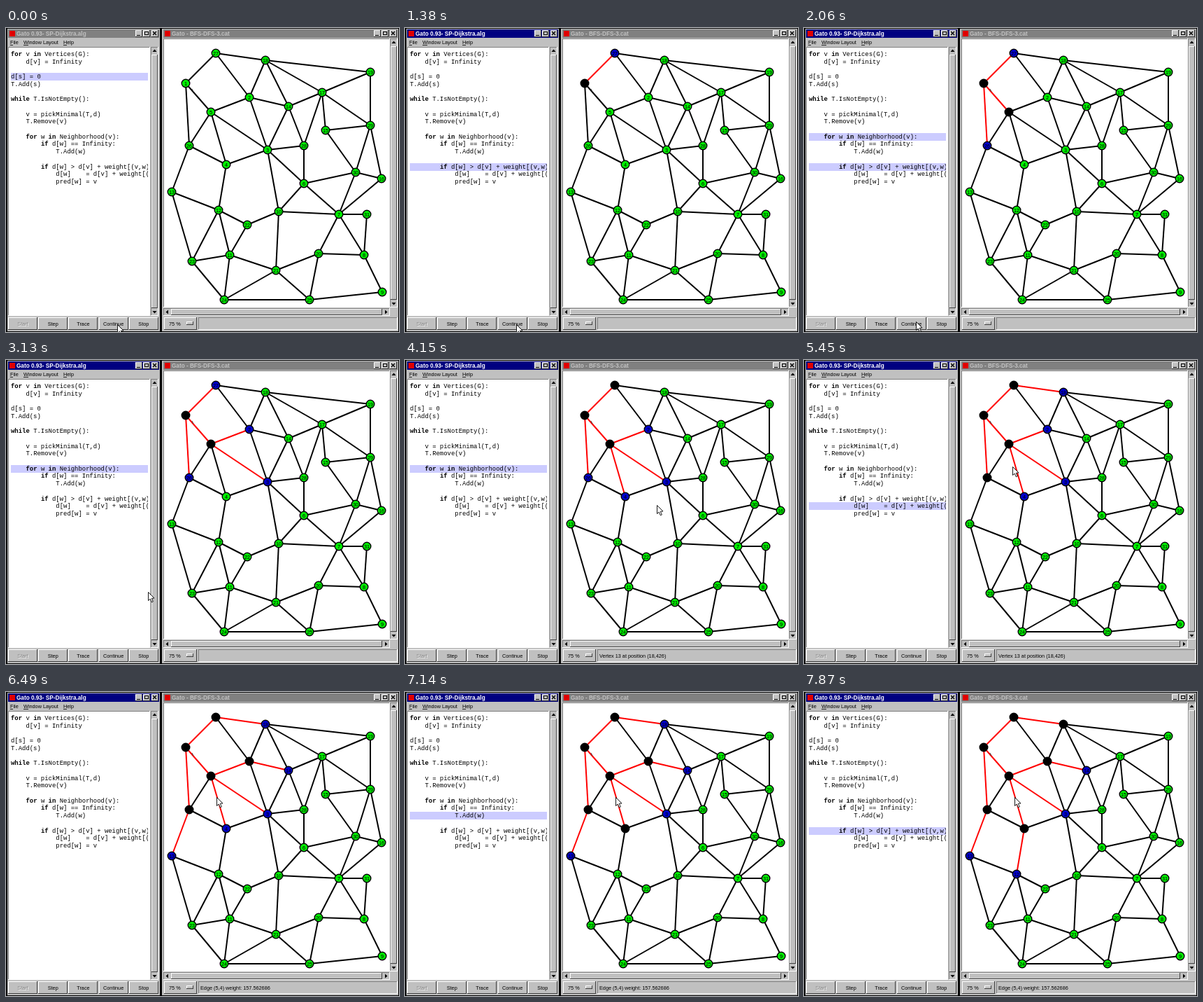
Animation of 562x434 px, one loop 8 s. Source, as an HTML page with a canvas:

```html
<!DOCTYPE html>
<html lang="en">
<head>
<meta charset="utf-8">
<title>Shortest paths</title>
<style>
html, body { margin: 0; width: 562px; height: 434px; overflow: hidden; background: #000; }
canvas { display: block; }
</style>
</head>
<body>
<canvas id="stage" width="562" height="434"></canvas>
<script>
const ctx = document.getElementById('stage').getContext('2d');
const LOOP = 8000;
const GRAY = '#c0c0c0', DARK = '#808080', NAVY = '#000080';
const SANS = '"Liberation Sans", Arial, sans-serif';
const MONO = '"Liberation Mono", "Courier New", monospace';
const ROW = 10.7, CHAR = 5.36, TOP = 32;

// Bold words are wrapped in asterisks.
const code = [
  '*for* v *in* Vertices(G):',
  '    d[v] = Infinity',
  '',
  'd[s] = 0',
  'T.Add(s)',
  '',
  '*while* T.IsNotEmpty():',
  '',
  '    v = pickMinimal(T,d)',
  '    T.Remove(v)',
  '',
  '    *for* w *in* Neighborhood(v):',
  '        *if* d[w] == Infinity:',
  '            T.Add(w)',
  '',
  '        *if* d[w] > d[v] + weight[(v,w)]:',
  '            d[w]    = d[v] + weight[(v,w)]',
  '            pred[w] = v'
];

// id:x,y
const nodes = {};
`1:257,79 2:348,99 3:374,174 4:315,195 5:293,120 6:426,222 7:476,266 8:512,324
9:538,377 10:390,262 11:320,324 12:304,260 13:237,234 14:404,112 15:457,146
16:537,215 17:452,92 18:371,46 19:521,63 20:447,322 21:386,346 22:345,281
23:266,333 24:312,388 25:434,388 26:262,168 27:300,36 28:426,168 29:521,139
30:500,206 31:516,266`.split(/\s+/).forEach(s => {
  const [id, x, y] = s.split(/[:,]/).map(Number);
  nodes[id] = { x, y };
});

// id:neighbours
const edges = `27:1,18,2 18:19,17,2,14 19:17,29 1:5,26 5:2,3,4,26 2:14,3 14:17,28,3
17:28,15,29 15:29,30 29:30,16 30:16,6,7 28:6,3 3:4,6,10 6:10,7 16:7 7:31,8,20,10
31:8 10:21,22 26:4,13 4:12 13:12,23 12:22,11,23 22:11 11:23,24,21 23:24
21:24,25,20 20:25,8 24:25 25:9 8:9`.split(/\s+/).flatMap(s => {
  const [from, list] = s.split(':');
  return list.split(',').map(to => [from, to]);
});

const vertexInfo = 'Vertex 13 at position (18,426)';
const edgeInfo = 'Edge (5,4) weight: 157.562686';

// Each step changes only what it names.
const steps = [
  { t: 0, lines: [4], cursor: [159, 423], active: false, info: '' },
  { t: 100, active: true },
  { t: 720, lines: [12], done: 1 },
  { t: 1380, lines: [16], queue: 27, red: '27-1' },
  { t: 1730, lines: [17], queue: 5, red: '1-5' },
  { t: 2060, lines: [12, 16], done: 5, queue: 26, red: '1-26', cursor: [160, 419] },
  { t: 2440, lines: [16], cursor: [171, 403] },
  { t: 2780, lines: [17], queue: 2, red: '5-2', cursor: [187, 368] },
  { t: 3130, lines: [12], queue: 3, red: '5-3', cursor: [203, 331] },
  { t: 3460, lines: [16], cursor: [219, 274] },
  { t: 3770, lines: [12], queue: 4, red: '5-4', cursor: [238, 229], info: vertexInfo },
  { t: 4150, done: 27, cursor: [360, 207] },
  { t: 4440, lines: [16], queue: 18, red: '27-18', cursor: [291, 161] },
  { t: 4800, lines: [10], cursor: [292, 159] },
  { t: 5140, lines: [16], done: 26, cursor: [297, 156] },
  { t: 5450, lines: [17], cursor: [298, 152] },
  { t: 5800, lines: [16], done: 2, queue: 13, red: '26-13' },
  { t: 6160, cursor: [301, 150], info: edgeInfo },
  { t: 6490, lines: [], queue: 14, red: '2-14' },
  { t: 6830, lines: [16], done: 4 },
  { t: 7140, lines: [14] },
  { t: 7500, lines: [12], done: 18, queue: 12, red: '4-12' },
  { t: 7870, lines: [16] }
];

function stateAt(time) {
  const state = { fill: {}, red: new Set() };
  for (const s of steps) {
    if (s.t > time) break;
    for (const key of ['lines', 'cursor', 'active', 'info'])
      if (key in s) state[key] = s[key];
    if (s.done) state.fill[s.done] = '#000';
    if (s.queue) state.fill[s.queue] = '#0000cc';
    if (s.red) state.red.add(s.red);
  }
  return state;
}

function rect(x, y, w, h, color) {
  ctx.fillStyle = color;
  ctx.fillRect(x, y, w, h);
}

function bevel(x, y, w, h, sunken = false, fill = GRAY) {
  rect(x, y, w, h, sunken ? '#fff' : '#404040');
  rect(x, y, w - 1, h - 1, sunken ? DARK : '#fff');
  rect(x + 1, y + 1, w - 2, h - 2, fill);
}

function text(str, x, y, size, color = '#000', style = '', align = 'left', family = SANS) {
  ctx.font = `${style} ${size}px ${family}`;
  ctx.textAlign = align;
  ctx.textBaseline = 'alphabetic';
  ctx.fillStyle = color;
  ctx.fillText(str, x, y);
}

function line(x1, y1, x2, y2, color, width = 1) {
  ctx.strokeStyle = color;
  ctx.lineWidth = width;
  ctx.beginPath();
  ctx.moveTo(x1, y1);
  ctx.lineTo(x2, y2);
  ctx.stroke();
}

function poly(points, fill) {
  ctx.beginPath();
  points.forEach(([x, y]) => ctx.lineTo(x, y));
  ctx.closePath();
  ctx.fillStyle = fill;
  ctx.fill();
}

function arrow(x, y, angle) {
  ctx.save();
  ctx.translate(x, y);
  ctx.rotate(angle);
  poly([[0, -2], [3, 1.5], [-3, 1.5]], '#000');
  ctx.restore();
}

function titleBar(x, w, title, active) {
  rect(x, 2, w, 12, active ? NAVY : DARK);
  rect(x + 2, 4, 8, 8, '#e00000');
  text(title, x + 12, 11, 8.2, active ? '#fff' : GRAY, 'bold');
  const right = x + w;
  [right - 34, right - 23, right - 11].forEach(bx => bevel(bx, 3, 10, 10));
  rect(right - 32, 10, 5, 1, '#000');
  ctx.strokeStyle = '#000';
  ctx.lineWidth = 1;
  ctx.strokeRect(right - 20.5, 5.5, 5, 4);
  line(right - 9, 5, right - 4, 10, '#000', 1.2);
  line(right - 4, 5, right - 9, 10, '#000', 1.2);
}

function vScroll(x, y, w, h) {
  bevel(x, y, w, h, true);
  bevel(x + 1, y + 11, w - 2, h - 22);
  arrow(x + w / 2, y + 5.5, 0);
  arrow(x + w / 2, y + h - 5.5, Math.PI);
}

function hScroll(x, y, w, h) {
  bevel(x, y, w, h, true);
  bevel(x + 11, y + 1, w - 22, h - 2);
  arrow(x + 5.5, y + h / 2, -Math.PI / 2);
  arrow(x + w - 5.5, y + h / 2, Math.PI / 2);
}

function codeLine(str, row) {
  let col = 0;
  const y = TOP + row * ROW + 8;
  str.split('*').forEach((part, i) => {
    const lead = part.length - part.trimStart().length;
    text(part.trimStart(), 7 + (col + lead) * CHAR, y, CHAR / 0.6, '#000',
      i % 2 ? 'bold' : '', 'left', MONO);
    col += part.length;
  });
}

function codeWindow(state) {
  rect(2, 1, 218, 432, GRAY);
  titleBar(3, 216, 'Gato 0.93- SP-Dijkstra.alg', state.active);

  [['File', 6, 4], ['Window Layout', 25, 7], ['Help', 82, 5]].forEach(([label, x, w]) => {
    text(label, x, 23, 7.3);
    rect(x, 24, w, 0.8, '#000');
  });

  bevel(3, 27, 203, 384, true, '#fff');
  ctx.save();
  ctx.beginPath();
  ctx.rect(7, 28, 196, 380);
  ctx.clip();
  for (const n of state.lines)
    rect(7, Math.round(TOP + (n - 1) * ROW), 196, 11, '#ccccff');
  code.forEach(codeLine);
  ctx.restore();
  vScroll(207, 27, 11, 384);

  ['Start', 'Step', 'Trace', 'Continue', 'Stop'].forEach((label, i) => {
    const x = 3 + i * 43.2, mid = x + 21;
    bevel(Math.round(x), 413, 42, 18);
    if (i === 0) text(label, mid + 0.7, 425.7, 7.3, '#fff', '', 'center');
    text(label, mid, 425, 7.3, i ? '#000' : DARK, '', 'center');
  });
}

function graph(state) {
  for (const [a, b] of edges) {
    const p = nodes[a], q = nodes[b];
    line(p.x, p.y, q.x, q.y, state.red.has(a + '-' + b) ? '#f00' : '#000', 2);
  }
  for (const id in nodes) {
    const { x, y } = nodes[id];
    ctx.beginPath();
    ctx.arc(x, y, 5.8, 0, Math.PI * 2);
    ctx.fillStyle = state.fill[id] || '#00f000';
    ctx.fill();
    ctx.strokeStyle = '#000';
    ctx.lineWidth = 1.4;
    ctx.stroke();
    text(id, x, y + 2.6, 7.3, '#000', '', 'center');
  }
  line(266, 87, 268, 91, '#444', 1);
}

function graphWindow(state) {
  rect(223, 1, 338, 432, GRAY);
  titleBar(225, 335, 'Gato - BFS-DFS-3.cat', false);
  bevel(225, 15, 324, 384, true, '#fff');
  graph(state);
  vScroll(549, 15, 11, 384);
  hScroll(225, 400, 324, 11);

  bevel(226, 413, 47, 18);
  text('75 %', 233, 425, 7.3);
  bevel(258, 419, 10, 5);
  bevel(275, 413, 285, 18, true);
  text(state.info, 278, 425, 7.3);
}

function pointer([x, y]) {
  const shape = [[0, 0], [0, 12], [2.7, 9.6], [4.8, 14.3], [6.8, 13.4], [4.8, 8.8], [8.5, 8.5]];
  ctx.save();
  ctx.translate(x + 0.5, y + 0.5);
  poly(shape, '#fff');
  ctx.strokeStyle = '#000';
  ctx.lineWidth = 0.9;
  ctx.stroke();
  ctx.restore();
}

function draw(now) {
  const state = stateAt(now % LOOP);
  rect(0, 0, 562, 434, '#000');
  codeWindow(state);
  graphWindow(state);
  pointer(state.cursor);
}

let start;
function tick(now) {
  start ??= now;
  draw(now - start);
  requestAnimationFrame(tick);
}
draw(0);
requestAnimationFrame(tick);
</script>
</body>
</html>
```
